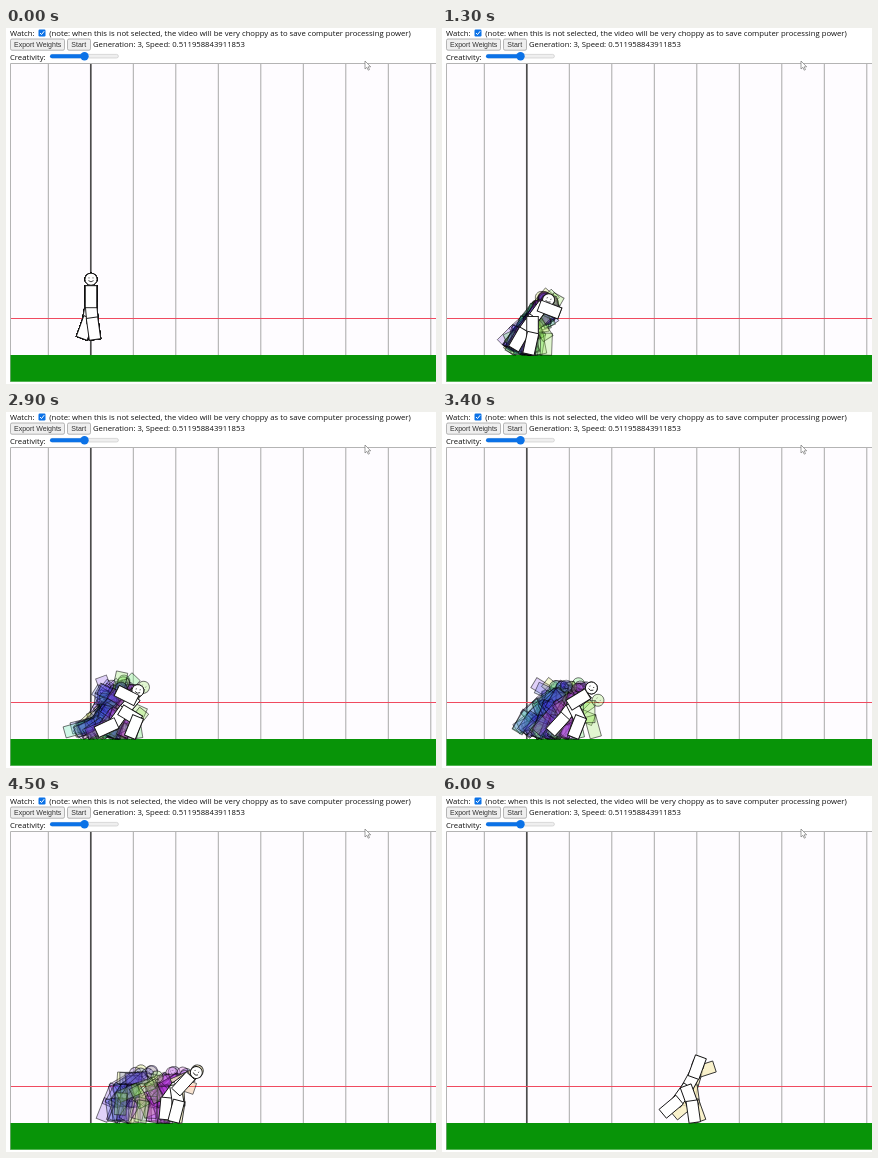
An HTML page that plays this animation: 430x356 px, repeating every 6100 ms.

```html
<!DOCTYPE html>
<html lang="en">
<head>
<meta charset="utf-8">
<title>Walker evolution</title>
<style>
  html, body { margin: 0; width: 100%; height: 100%; overflow: hidden; background: #fff; }
  svg { display: block; width: 430px; height: 356px; }
  .label { font: 7.72px "Open Sans", sans-serif; fill: #111; }
  .btn rect { fill: #efefef; stroke: #999; stroke-width: .7; }
  .btn text { font: 7px "Liberation Sans", Arial, sans-serif; fill: #333; }
</style>
</head>
<body>
<svg viewBox="0 0 430 356" xmlns="http://www.w3.org/2000/svg">
  <rect width="430" height="356" fill="#fff"/>
  <rect x="4.5" y="35.5" width="426" height="292" fill="#fefcff"/>
  <text class="label" x="4" y="8.2">Watch:</text>
  <rect x="32.5" y="1.5" width="7" height="7" rx="1.2" fill="#0b72e7"/>
  <path d="M34 5l1.5 1.6 2.7-3.4" fill="none" stroke="#fff"/>
  <text class="label" x="43.3" y="8.2">(note: when this is not selected, the video will be very choppy as to save computer processing power)</text>
  <g class="btn">
    <rect x="4.5" y="11" width="54" height="11.2" rx="1.5"/>
    <text x="8" y="19.2">Export Weights</text>
    <rect x="61.5" y="11" width="23" height="11.2" rx="1.5"/>
    <text x="65.3" y="19.2">Start</text>
  </g>
  <text class="label" x="87" y="19.2">Generation: 3, Speed: 0.511958843911853</text>
  <text class="label" x="4" y="31.9">Creativity:</text>
  <rect x="44.4" y="26.4" width="68" height="3.6" rx="1.8" fill="#efefef" stroke="#c4c4c4" stroke-width=".6"/>
  <rect x="44" y="26.2" width="35" height="4" rx="2" fill="#0b72e7"/>
  <circle cx="78.5" cy="28.2" r="4.2" fill="#0b72e7"/>
  <path d="M4.5 354V35.5H430" fill="none" stroke="#b4b4b4"/>
  <g id="grid"></g>
  <path d="M5 290.5H430" stroke="#f04a60"/>
  <rect x="4.5" y="327" width="426" height="26.7" fill="#089408"/>
  <g id="crowd"></g>
  <path d="M359 33v8l1.9-1.7 1.3 2.9 1.3-.6-1.3-2.8h2.5z" fill="#fff" stroke="#777" stroke-width=".7"/>
</svg>
<script>
const LOOP = 6100, STEP = 100, FLOOR = 327.3, START_X = 85;
const BONE = 16, INSET = 3, LONG = 22, WIDE = 11.5;
const TAU = 2 * Math.PI, RAD = Math.PI / 180;
const crowd = document.getElementById("crowd");

let seed = 29;
function rand(a, b) {
  seed = (seed * 16807) % 2147483647;
  return a + (b - a) * seed / 2147483647;
}

function make(parent, tag, attrs = {}) {
  const el = document.createElementNS("http://www.w3.org/2000/svg", tag);
  for (const k in attrs) el.setAttribute(k, attrs[k]);
  parent.appendChild(el);
  return el;
}

// head first, then torso, both legs and the arm on top
function walker(fill, stroke, extra) {
  const g = make(crowd, "g", { fill, stroke, "stroke-width": .9 });
  const head = make(g, "g");
  make(head, "circle", { r: 6 });
  make(head, "path", { d: "M-2-1.8v1M2-1.8v1M-2.6 1.4Q0 3.8 2.6 1.4", fill: "none", "stroke-width": .8 });
  const limbs = Array.from({ length: 6 }, () =>
    make(g, "rect", { x: -WIDE / 2, y: -INSET, width: WIDE, height: LONG }));
  return { g, head, limbs, ...extra };
}

const clamp = v => Math.max(0, Math.min(1, v));
const wave = (s, peak, period) => Math.cos(TAU * (s - peak) / period);

// turning points in seconds for the joints that kick irregularly
const BEATS = [0, 1.3, 2.1, 2.9, 3.9, 5.2, 6];
function through(values, s) {
  let i = 0;
  while (i < BEATS.length - 2 && s >= BEATS[i + 1]) i++;
  const u = (s - BEATS[i]) / (BEATS[i + 1] - BEATS[i]);
  return values[i] + (values[i + 1] - values[i]) * u;
}

// angles in degrees: 0 hangs down, 90 points right
function gait(s) {
  const lean = clamp(s / 1.2);
  return {
    x: START_X + 3.1 * s ** 2.2,
    torso: 180 - lean * (43 - 14 * wave(s, 2, 4)),
    head: 180 - lean * (38 - 18 * wave(s, 2.4, 3.7)),
    arm: through([0, 69, 64, -117, 0, -92, 160], s),
    thigh1: -10 - 26 * lean,
    shin1: through([-20, -30, -30, -65, -20, 12, -50], s),
    thigh2: through([5, 0, -20, 59, -5, 25, 20], s),
    shin2: -22 + 30 * ((s - 3) / 3) ** 2
  };
}

const along = ([x, y], angle, d) => [x + d * Math.sin(angle * RAD), y + d * Math.cos(angle * RAD)];

function put(el, [x, y], dy, turn) {
  el.setAttribute("transform", `translate(${x.toFixed(2)} ${(y + dy).toFixed(2)}) rotate(${turn.toFixed(2)})`);
}

function place(w, p, s) {
  const hip = [p.x, 0];
  const neck = along(hip, p.torso, BONE);
  const bones = [
    [neck, p.torso + 180],
    [hip, p.thigh1], [along(hip, p.thigh1, BONE), p.shin1],
    [hip, p.thigh2], [along(hip, p.thigh2, BONE), p.shin2],
    [neck, p.arm]
  ];
  // the lowest corner rests on the floor once the drop is over
  const low = Math.max(...bones.map(([from, a]) =>
    along(from, a, LONG - INSET)[1] + Math.abs(Math.sin(a * RAD)) * WIDE / 2));
  const dy = FLOOR - 15 * (1 - clamp(s / .5) ** 2) - low;
  bones.forEach(([from, a], i) => put(w.limbs[i], from, dy, -a));
  put(w.head, along(neck, p.head, 9.5), dy, (180 - p.head) / 2);
}

const grid = document.getElementById("grid");
for (let i = 0; i < 10; i++) {
  make(grid, "path", {
    d: `M${42.3 + i * 42.5} 36V327`,
    stroke: i === 1 ? "#4c4c4c" : "#a8a8a8",
    "stroke-width": i === 1 ? 1.7 : 1
  });
}

// every third walker is a wild mutant, the others stay close to the leader
const JOINTS = { torso: 16, head: 24, arm: 100, thigh1: 30, shin1: 32, thigh2: 30, shin2: 32 };
const pack = Array.from({ length: 26 }, (_, i) => {
  const wild = i % 3 === 0;
  const hue = wild ? rand(30, 230) : rand(215, 295);
  const moves = Object.entries(JOINTS).map(([name, reach]) => ({
    name, reach: reach * (wild ? rand(.7, 1.5) : rand(.1, .7)),
    rate: rand(1.5, 3.5), phase: rand(0, TAU)
  }));
  return walker(`hsla(${hue},75%,${wild ? 62 : 56}%,${wild ? .28 : .22})`, "rgba(0,0,0,.55)", {
    moves, shift: wild ? rand(-8, 9) : rand(-3, 3), pace: rand(.3, .92), gone: rand(4.05, 5.1)
  });
});
const runner = walker("rgba(248,238,190,.8)", "#333");
const leader = walker("#fff", "#111");

function stray(w, lead, s) {
  const grow = clamp(s / 1.6);
  const p = { ...lead, x: START_X + (lead.x - START_X) * w.pace + w.shift * grow };
  for (const m of w.moves) p[m.name] += m.reach * grow * Math.sin(s * m.rate + m.phase);
  return p;
}

// the runner-up copies the leader, then straightens up and swings its arm back
function follow(lead, s) {
  const k = clamp((s - 3.9) / 1.3);
  return {
    ...lead, x: lead.x + 5 * k,
    torso: lead.torso + 12 * k, head: lead.head + 6 * k, arm: lead.arm - 52 * k,
    thigh1: lead.thigh1 + 24 * k, thigh2: lead.thigh2 - 12 * k, shin2: lead.shin2 + 12 * k
  };
}

function draw(s) {
  const lead = gait(s);
  for (const w of pack) {
    const alive = s < w.gone;
    w.g.setAttribute("display", alive ? "inline" : "none");
    if (alive) place(w, stray(w, lead, s), s);
  }
  place(runner, follow(lead, s), s);
  place(leader, lead, s);
}

const start = performance.now();
function frame(now) {
  const t = Math.max(0, now - start) % LOOP;
  draw(Math.floor(t / STEP) * STEP / 1000);
  requestAnimationFrame(frame);
}
draw(0);
requestAnimationFrame(frame);
</script>
</body>
</html>
```
